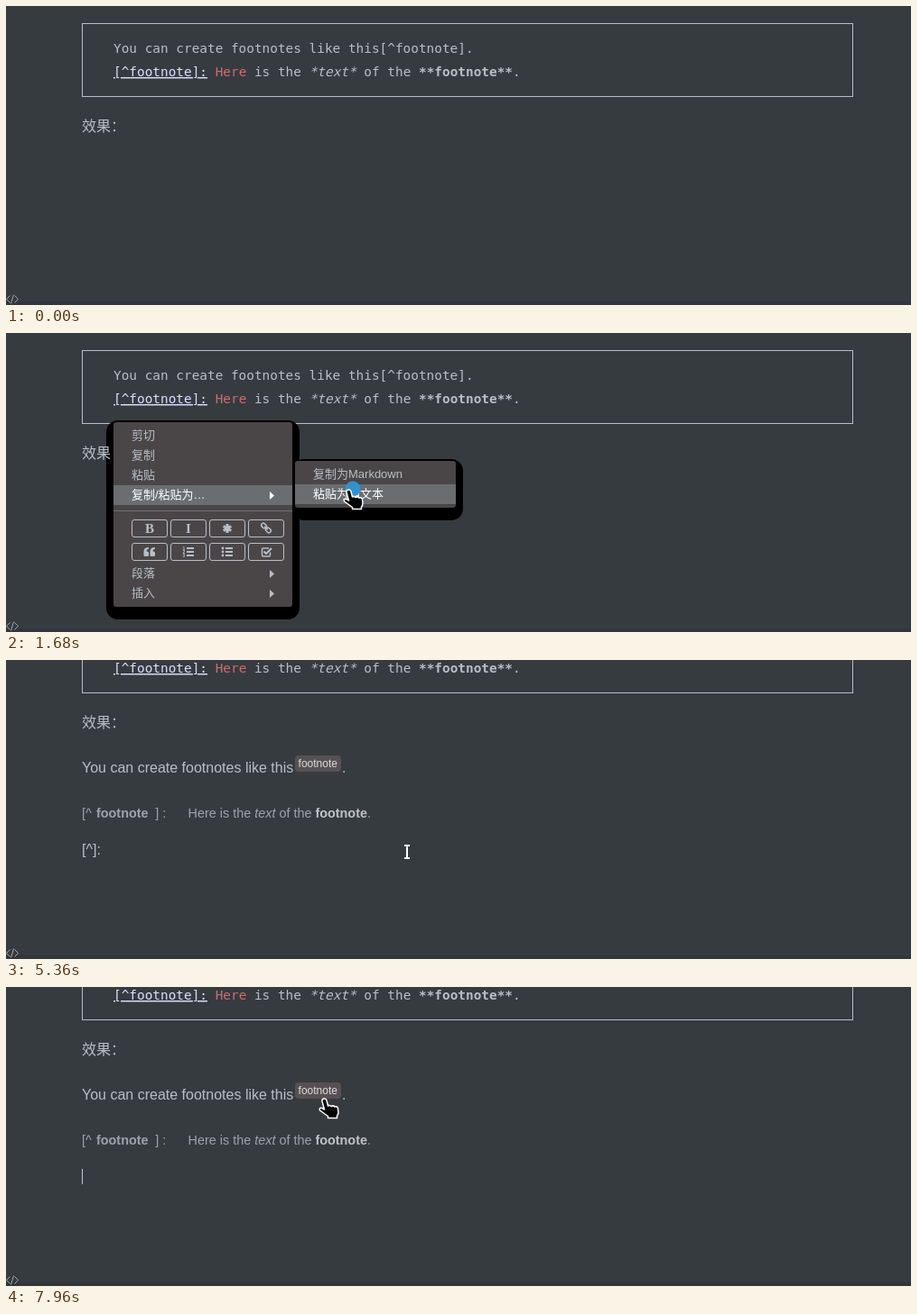
Recreate the animation shown at these times as an HTML page. Size 1002 by 332 pixels, loop 8000 ms.

```html
<!DOCTYPE html>
<html lang="zh-CN">
<head>
<meta charset="utf-8">
<title>Footnotes</title>
<style>
  html, body { margin: 0; width: 100%; height: 100%; overflow: hidden; background: #363b40; }
  svg { display: block; width: 1002px; height: 332px; }
  text { font: 16px "Liberation Sans", "Noto Sans CJK SC", "Noto Sans CJK", sans-serif; fill: #b8bfc6; white-space: pre; }
  .code text { font: 14.4px "DejaVu Sans Mono", monospace; }
  .link { fill: #dddfff; text-decoration: underline; }
  .red { fill: #d26b6b; }
  .code .b, .note .b { font-weight: bold; }
  .i { font-style: italic; }
  .note text { font-size: 14.4px; fill: #9ea4a9; }
  .note .strong { fill: #c0c2c4; font-weight: bold; }
  .menu text { font-size: 13px; }
  .menu .on { fill: #fff; }
  .menu .serif { font: bold 15px "Liberation Serif", serif; text-anchor: middle; }
  .menu .num { font-size: 5px; font-weight: bold; }
  .btn { fill: none; stroke: #b8bfc6; }
  .icon { fill: #b8bfc6; }
  .line { fill: none; stroke: #b8bfc6; stroke-width: 2; }
  .thin { stroke-width: 1.5; }
  .thick { stroke-width: 3; }
  .panel { fill: #4a4648; }
  .hot { fill: #6a6e71; }
</style>
</head>
<body>
<svg viewBox="0 0 1002 332">
  <g id="page">
    <rect x="84.5" y="19.5" width="853" height="81" fill="none" stroke="#b8bfc6"/>
    <g class="code">
      <text x="119" y="52">You can create footnotes like this[^footnote].</text>
      <text x="119" y="78"><tspan class="link">[^footnote]:</tspan> <tspan class="red">Here</tspan> is the </text>
      <text transform="translate(335.7 78) skewX(-14)">*text*</text>
      <text x="387.7" y="78"> of the <tspan class="b">**footnote**</tspan>.</text>
    </g>
    <rect id="shade" x="111" y="97" width="214" height="221" rx="13"/>
    <text x="84" y="139">效果：</text>
    <g id="result">
      <text x="84" y="189">You can create footnotes like this</text>
      <rect x="320" y="170" width="51" height="18" rx="4" fill="#565153"/>
      <text x="323.6" y="183" style="font-size:12px;fill:#ddd">footnote</text>
      <text x="372" y="189">.</text>
      <g class="note">
        <text x="84" y="239">[^</text>
        <text x="100" y="239" class="b">footnote</text>
        <text x="165.3" y="239">]</text>
        <text x="173.3" y="239">:</text>
        <text x="201.6" y="239">Here is the <tspan class="i">text</tspan> of the <tspan class="strong">footnote</tspan>.</text>
      </g>
    </g>
    <text id="typed" x="84" y="280"></text>
    <rect id="caret" width="1" height="17" fill="#c3c9ce"/>
  </g>

  <rect y="328" width="1002" height="4" fill="#000" opacity=".08"/>
  <path d="M4.5 321.5L.5 325.5L4.5 329.5M8.5 320.5L5.5 330.5M9.5 321.5L13.5 325.5L9.5 329.5" fill="none" stroke="#a0a6ab"/>

  <g id="menu" class="menu">
    <g id="sub">
      <rect x="317" y="140" width="189" height="68" rx="13"/>
      <rect class="panel" x="320" y="142" width="178" height="52" rx="3"/>
      <rect id="subHot" class="hot" x="320" y="168" width="178" height="22"/>
      <text x="340" y="161">复制为Markdown</text>
      <text id="plain" x="340" y="183">粘贴为纯文本</text>
    </g>
    <rect class="panel" x="119" y="99" width="198" height="205" rx="3"/>
    <rect class="hot" x="119" y="169" width="198" height="22"/>
    <rect x="119" y="197" width="198" height="1" fill="#707173"/>
    <text x="139" y="118">剪切</text>
    <text x="139" y="140">复制</text>
    <text x="139" y="162">粘贴</text>
    <text x="139" y="184" class="on">复制/粘贴为…</text>
    <text x="139" y="271">段落</text>
    <text x="139" y="293">插入</text>
    <path d="M292 176l5 4.5l-5 4.5z" fill="#fff"/>
    <path class="icon" d="M292 263l5 4.5l-5 4.5zM292 285l5 4.5l-5 4.5z"/>
    <g id="buttons"></g>
    <text x="159" y="222" class="serif">B</text>
    <text x="202" y="222" class="serif i">I</text>
    <path class="line thick" d="M245 212v10M240.7 214.5l8.6 5M240.7 219.5l8.6-5"/>
    <g class="line thin" transform="translate(288 216.5) rotate(45)">
      <rect x="-6.5" y="-2.2" width="6" height="4.4" rx="2"/>
      <rect x=".5" y="-2.2" width="6" height="4.4" rx="2"/>
      <path d="M-2.5 0h5"/>
    </g>
    <path id="quote" class="icon" d="M158 238v1.8q-2.5.2-2.5 2.8h1q1.5 0 1.5 1.5v2.4q0 1.5-1.5 1.5h-2.5q-1.5 0-1.5-1.5v-4q0-4.5 5.5-4.5z"/>
    <use href="#quote" x="7"/>
    <g id="lists"></g>
    <path class="line thin" d="M292.5 243.5v3q0 1.5-1.5 1.5h-6q-1.5 0-1.5-1.5v-6q0-1.5 1.5-1.5h6"/>
    <path class="line" d="M285.5 242.5l2.5 2.5l6-6"/>
  </g>

  <circle id="ring" fill="none"/>
  <path id="beam" d="M-3-7h2.2L0-6.2L.8-7H3M0-7V7M-3 7h2.2L0 6.2L.8 7H3" fill="none" stroke="#fff" stroke-width="2"/>
  <path id="hand" fill="#000" stroke="#fff" stroke-width="1.5" stroke-linejoin="round"
    d="M-1 0Q1.5-.5 2 2L3.5 8Q5.5 6.5 7 8.5Q9.5 7 11 9Q14 8 14.5 11L15 15Q15 17.5 13.5 19V21.5H3.5V19.5L-5.5 13Q-6.5 9.5-3 10.5L-.5 12L-3 3Q-3.5.5-1 0Z"/>
</svg>
<script>
const LOOP = 8000, BLINK = 500;
const PASTE = 1800, MENU = 760, ENTER = 3750, LEFT = 84;
const el = id => document.getElementById(id);
const set = (node, attrs) => { for (const k in attrs) node.setAttribute(k, attrs[k]); };
const show = (node, on) => { node.style.display = on ? '' : 'none'; };
const add = (id, markup) => el(id).insertAdjacentHTML('beforeend', markup);
const mix = (a, b, k) => a + (b - a) * k;
const clamp = k => Math.min(1, Math.max(0, k));
const ease = k => k * k * (3 - 2 * k);

for (let i = 0; i < 8; i++)
  add('buttons', `<rect class="btn" x="${139.5 + 43 * (i % 4)}" y="${i < 4 ? 207.5 : 233.5}" width="39" height="19" rx="2.5"/>`);
for (let i = 0; i < 3; i++) {
  const y = 239 + 4 * i;
  add('lists', `<path class="line" d="M200 ${y}h8M243 ${y}h8"/>
    <circle class="icon" cx="240" cy="${y}" r="1.4"/>
    <text class="num" x="195.5" y="${y + 2}">${i + 1}</text>`);
}

// each glide of the pointer: start, end, x and y reached
const glides = [
  [520, 700, 118, 183], [780, 1040, 184, 183], [1150, 1640, 380, 174],
  [PASTE, 1930, 281, 175], [2080, 2360, 414, 202], [2950, 3080, 446, 205],
  [4820, 4910, 444, 213], [5360, 5840, 108, 217], [6120, 6570, 200, 202],
  [6760, 7560, 342, 155], [7600, 7960, 353, 124]
];
const clicks = [{ time: 1600, x: 384, y: 173 }, { time: 6120, x: 108, y: 217 }];

// every edit restarts the caret's blinking
const LABEL = '[^]:';
const edits = [
  { time: 140 - 2 * BLINK, y: 176 },
  { time: PASTE, x: 403, y: 226 },
  { time: ENTER, y: 266 },
  { time: 3840, y: 266, text: LABEL, pos: 2 },
  { time: 6220, y: 266, text: LABEL, pos: 4 }
];
for (let n = 3; n >= 0; n--)
  edits.push({ time: 7480 - 160 * n, y: 266, text: LABEL.slice(0, n), pos: n });

function pointer(t) {
  let x = 104, y = 196;
  for (const [start, end, tx, ty] of glides) {
    const k = ease(clamp((t - start) / (end - start)));
    x = mix(x, tx, k);
    y = mix(y, ty, k);
  }
  return [Math.round(x), Math.round(y)];
}

function drawRing(t) {
  const click = clicks.find(c => t >= c.time && t < c.time + 240);
  show(el('ring'), click);
  if (!click) return;
  const age = t - click.time, k = clamp((age - 80) / 50);
  const outer = 6 + age * 0.03, hole = Math.max(0, (age - 80) * 0.07);
  set(el('ring'), {
    cx: click.x, cy: click.y, r: (outer + hole) / 2, 'stroke-width': outer - hole,
    stroke: `rgb(${mix(47, 59, k)},${mix(148, 111, k)},${mix(208, 174, k)})`,
    opacity: 1 - clamp((age - 150) / 110)
  });
}

function drawText(t) {
  const { time, x = LEFT, y, text = '', pos = 0 } = edits.findLast(e => e.time <= t);
  const typed = el('typed');
  if (typed.textContent !== text) typed.textContent = text;
  const before = pos ? typed.getSubStringLength(0, pos) : 0;
  set(el('caret'), { x: x + Math.round(before), y });
  show(el('caret'), (t - time) % (2 * BLINK) < BLINK);
}

function draw(t) {
  const scroll = t < 1850 ? 0 : t < ENTER ? 25 : 64;
  set(el('page'), { transform: `translate(0 ${-scroll})` });
  show(el('result'), t >= PASTE);
  drawText(t);

  const [x, y] = pointer(t);
  const open = t >= MENU && t < PASTE;
  const hot = open && x >= 320;
  show(el('menu'), open);
  show(el('shade'), open);
  show(el('sub'), t >= 980);
  show(el('subHot'), hot);
  el('plain').classList.toggle('on', hot);

  const hand = open || t >= 7700;
  show(el('hand'), hand);
  show(el('beam'), t >= 520 && !hand);
  set(el(hand ? 'hand' : 'beam'), { transform: `translate(${x} ${y})` });
  drawRing(t);
}

const begin = performance.now();
function tick() {
  draw((performance.now() - begin) % LOOP);
  requestAnimationFrame(tick);
}
tick();
</script>
</body>
</html>
```
